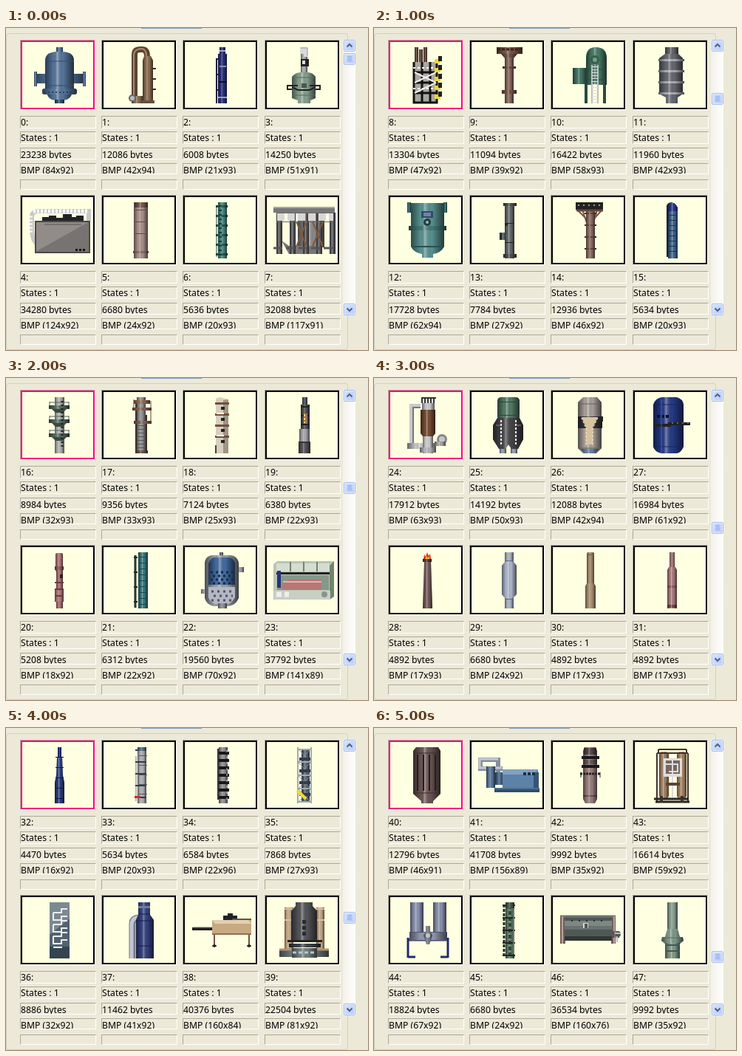
Recreate the animation shown at these times as an HTML page. Size 490 by 436 pixels, loop 6000 ms.

```html
<!DOCTYPE html>
<html lang="en">
<head>
<meta charset="utf-8">
<title>Symbol library</title>
<style>
html, body { margin: 0; width: 100%; height: 100%; overflow: hidden; background: #ece9d8; }
body { position: relative; font: 12.2px "Noto Sans", sans-serif; color: #000; }
body > *, .cell > * { position: absolute; box-sizing: border-box; }
#tab { left: 183px; top: 0; width: 82px; height: 1px; background: #7f9db9; }
#group { left: 0; top: 7px; width: 463px; height: 429px; border: 1px solid #d0d0bf; border-radius: 4px; }
#view { left: 19px; top: 16px; width: 434px; height: 420px; overflow: hidden; }
#strip { display: grid; grid-template-columns: 110px 110px 111px 103px; grid-auto-rows: 210px; animation: page 6s steps(6) infinite; }
@keyframes page { to { transform: translateY(-2520px); } }
.cell { position: relative; }
.cell > * { left: 0; margin: 0; border: 1px solid; border-color: #aca899 #fff #fff #aca899; overflow: hidden; white-space: nowrap; }
.cell svg { top: 0; width: 102px; height: 95px; background: #ffffe1; box-shadow: inset 0 0 0 2px #000; }
.cell:nth-child(8n+1) svg { box-shadow: inset 0 0 0 2px #ff0080; }
.cell p { width: 103px; line-height: 15px; }
.cell p:nth-of-type(1) { top: 103px; height: 17px; }
.cell p:nth-of-type(2) { top: 124px; height: 17px; }
.cell p:nth-of-type(3) { top: 146px; height: 16px; line-height: 17px; }
.cell p:nth-of-type(4) { top: 167px; height: 15px; line-height: 17px; }
.cell p:nth-of-type(5) { top: 189px; height: 14px; }
#track { left: 456px; top: 16px; width: 17px; height: 373px; background: linear-gradient(90deg, #f3f1ec, #fefefb); }
.button { left: 457px; width: 16px; height: 16px; border: 1px solid #a9bfee; border-radius: 2px; box-shadow: inset 0 0 0 1px #e4ecff; background: linear-gradient(135deg, #d5e2fe, #b9cbf5); }
.button svg { position: absolute; left: 0; top: 0; width: 14px; height: 14px; }
#thumb { animation: scroll 6s steps(6) infinite; }
@keyframes scroll { from { top: 34px; } to { top: 356px; } }
</style>
</head>
<body>
<svg width="0" height="0"><defs><linearGradient id="round">
<stop offset="0" stop-opacity=".5"/><stop offset=".3" stop-opacity="0"/>
<stop offset=".42" stop-color="#fff" stop-opacity=".38"/><stop offset=".62" stop-opacity="0"/>
<stop offset="1" stop-opacity=".6"/></linearGradient></defs></svg>
<div id="tab"></div>
<div id="group"></div>
<div id="view"><div id="strip"></div></div>
<div id="track"></div>
<div class="button" style="top:16px"><svg><path d="M3.5 8.5L7 5L10.5 8.5" fill="none" stroke="#4d6185" stroke-width="2"/></svg></div>
<div class="button" style="top:373px"><svg><path d="M3.5 5.5L7 9L10.5 5.5" fill="none" stroke="#4d6185" stroke-width="2"/></svg></div>
<div class="button" id="thumb"><svg><path d="M4 3.5H10M4 5.5H10M4 7.5H10M4 9.5H10" stroke="#8caaec"/></svg></div>
<script>
// Drawing space: x = 0 is the icon axis, y runs from 0 to 76.
const box = (x, y, w, h, c, r = 0) => `<rect x="${x}" y="${y}" width="${w}" height="${h}" rx="${r}" fill="${c}"/>`;
const tube = (x, y, w, h, c, r) => box(x, y, w, h, c, r) + box(x, y, w, h, 'url(#round)', r);
const shape = (d, c) => `<path d="${d}" fill="${c}"/>`;
const solid = (d, c) => shape(d, c) + shape(d, 'url(#round)');
const line = (d, c, w = 1, dash = '') => `<path d="${d}" fill="none" stroke="${c}" stroke-width="${w}" stroke-dasharray="${dash}"/>`;
const disc = (x, y, r, c) => `<circle cx="${x}" cy="${y}" r="${r}" fill="${c}"/>`;
const times = (n, f) => Array.from({ length: n }, (_, i) => f(i)).join('');
const bands = (n, y, step, x, w, h, c) => times(n, i => box(x, y + i * step, w, h, c));
const rings = (n, y, step, x, w, h, c) => times(n, i => tube(x, y + i * step, w, h, c));

const strip = document.getElementById('strip');
let count = 0;
function add(bytes, size, ...parts) {
  strip.insertAdjacentHTML('beforeend', `<div class="cell">
    <svg><g transform="translate(52 9)">${parts.join('')}</g></svg>
    <p>${count++}:</p><p>States : 1</p><p>${bytes} bytes</p><p>BMP (${size})</p><p></p></div>`);
}

const steel = '#55759b', navy = '#27317d', brown = '#8c6d50', dark = '#222';

add(23238, '84x92', tube(-4, 0, 9, 8, steel), tube(-34, 36, 70, 13, steel),
  tube(-34, 33, 4, 20, steel), tube(32, 33, 4, 20, steel),
  solid('M-19 18Q-19 7-4 6H5Q20 7 20 18V57H-19Z', steel), line('M-19 19H20M-19 52H20', '#304e70'),
  solid('M-17 61H18Q15 72 5 72H-5Q-15 72-17 61Z', steel), tube(-23, 56, 47, 8, steel, 3),
  line('M-20 61H21', '#24405f', 2, '2 3'), tube(-6, 71, 13, 5, '#345273'));
add(12086, '42x94', line('M-8 68V10Q-8 3 0 3H2Q9 3 9 12', '#5b4431', 8), line('M-9 68V10Q-8 2 2 2Q8 3 8 12', '#a68968', 2),
  solid('M5 12H14L17 18V76H3V18Z', brown), bands(3, 28, 14, 16, 5, 2, '#3a2c20'),
  tube(-12, 66, 16, 10, brown), disc(-11, 69, 5, '#666'), disc(-11, 69, 3, '#bbb'), box(2, 72, 17, 4, '#66503c'));
add(6008, '21x93', tube(-3, 0, 8, 9, navy), box(-3, 4, 8, 2, '#aab'), tube(-5, 9, 12, 67, navy),
  bands(3, 15, 21, -8, 5, 2, dark), line('M-7 15V76', '#15193f', 2), box(-3, 25, 9, 2, '#8d90ad'), box(-5, 46, 12, 2, '#111'), box(-5, 67, 12, 2, '#9da0b3'));
add(14250, '51x91', tube(-4, 9, 9, 28, '#aaa'), shape('M-5 0H5V13H0V9H-5Z', '#d9d9de'), line('M-4 1H5V12', '#999'),
  box(-4, 16, 11, 10, dark), box(-2, 18, 4, 5, '#ddd'), solid('M-16 40Q-11 34-4 34H5Q12 34 16 40V69L9 72V76H-8V72L-16 69Z', '#86a18d'),
  line('M-16 41H16M-16 65H16', '#526c5a'), line('M-22 51V57H-16M22 51V57H16M-22 52H-8M8 52H22', dark, 2), line('M-16 54L-8 58H8L16 54', dark, 2), box(-3, 49, 7, 6, '#455b4c'));
add(34280, '124x92', line('M-30 63V56Q-37 52-37 34V18Q-36 12-27 12H40V25', '#c8c8c8', 6), line('M-35 12H40', '#fff', 5, '3 2'), line('M-38 18V42', '#eee', 4, '3 2'),
  shape('M-23 25V20H-14V18H-4V21H5V16H17V20H23V18H33V25Z', dark), shape('M-32 26H41V67H-32Z', '#777371'),
  shape('M-32 26H41L-32 67Z', '#918c8a'), line('M-32 26H41V68H-32Z', '#4b4948', 2), bands(1, 63, 1, 22, 3, 3, '#111'), box(27, 63, 3, 3, '#111'), box(32, 63, 3, 3, '#111'), line('M-20 30H30', '#555'));
add(6680, '24x92', tube(-9, 0, 19, 76, '#ad918e'), tube(-8, 0, 18, 7, '#755952'), bands(3, 10, 16, -9, 19, 1, '#604b49'), rings(1, 66, 1, -10, 21, 3, '#86706e'));
add(5636, '20x93', tube(-5, 0, 12, 76, '#45887d'), rings(6, 4, 13, -8, 16, 3, '#285b55'), line('M-2 4V74', '#173d3a', 4, '2 4'), line('M-7 4V74', '#25524c'));
add(32088, '117x91', tube(-8, 14, 36, 47, '#8a8a88'), shape('M-30 52L-20 59H24V70H-20Z', '#777'),
  times(5, i => tube(-37 + i * 18, 14, 8, 56, '#59595b')), line('M-10 26L4 60M4 26L-10 60M12 26L26 60M26 26L12 60', '#80583b', 2),
  box(-41, 6, 83, 8, '#77777a'), line('M-41 7H42', '#aaa', 2), line('M-36 20H40', '#d7d7d7', 10, '10 4'), bands(2, 14, 12, -37, 76, 1, '#666'), line('M-41 62H42', '#555', 3, '12 5'));

add(13304, '47x92', times(3, i => tube(-17 + i * 6, i % 2 * 3, 5, 24, '#68483c')), shape('M-19 20H14V76H-19Z', '#aaa7a0'),
  line('M-18 20V75H13V20M-7 20V75M4 20V75M-18 34H13M-18 48H13M-18 62H13', '#111', 3), line('M-17 34L12 48M-17 48L12 34M-17 62L12 48', '#eee', 2),
  times(5, i => box(10, 16 + i * 12, 8, 6, '#eed92f') + box(15, 12 + i * 12, 5, 7, dark)), line('M-19 28H8M-19 56H8', '#fff', 2, '3 3'));
add(11094, '39x92', tube(-16, 0, 35, 9, '#775041'), line('M-15 3H18', '#38241d', 3, '4 2'), solid('M-10 9H12L7 15H-5Z', '#684b3f'),
  tube(-5, 14, 12, 62, '#89695e'), rings(2, 26, 32, -8, 18, 3, '#684b3f'), tube(-9, 58, 20, 5, '#775041'));
add(16422, '58x93', box(-7, 48, 4, 28, '#284b3f'), box(18, 48, 4, 28, '#284b3f'), tube(-23, 28, 19, 22, '#427463'),
  solid('M-5 15Q-5 0 8 0Q23 0 23 15V51H-5Z', '#477865'), line('M-5 30H23M-5 44H23', '#234b3d'), disc(7, 17, 6, '#345f50'), disc(7, 17, 3, '#789b89'),
  line('M3 24V76M11 24V76', '#bbb', 2), bands(13, 26, 4, 3, 8, 1, '#ddd'));
add(11960, '42x93', tube(-9, 0, 18, 12, '#64656b'), solid('M-9 9H9L15 15V63L8 68V76H-8V68L-17 63V15Z', '#666870'), rings(4, 16, 15, -18, 35, 3, '#aeb0b7'));
add(17728, '62x94', tube(-27, 1, 53, 11, '#477e7c'), tube(-27, 0, 5, 14, '#376967'), tube(22, 0, 5, 14, '#376967'), solid('M-22 8Q-15 1-5 1H6Q18 1 23 8V60Q18 69 8 70V75H-7V70Q-18 68-22 60Z', '#579290'),
  tube(-25, 32, 51, 6, '#427876'), line('M-20 60H20', '#26524f', 2), box(-8, 12, 16, 9, '#354769'), box(-5, 14, 10, 5, '#6c85a2'), disc(0, 27, 5, '#243c40'), disc(0, 27, 2, '#a2b5b4'));
add(7784, '27x92', tube(-12, 41, 10, 10, '#555b5c'), tube(-12, 42, 3, 8, dark), tube(-5, 1, 13, 75, '#666c6d'), tube(-7, 1, 18, 4, '#484d4f'), tube(-7, 70, 18, 5, '#484d4f'), bands(2, 28, 26, -5, 13, 1, dark), disc(-3, 30, 2, dark));
add(12936, '46x92', shape('M-19 0H18V10H-19Z', dark), line('M-16 4H16', '#998', 2, '2 5'), line('M-17 10L-5 22M17 10L6 22M-10 10L-4 28M10 10L5 28', '#755548', 2),
  tube(-5, 12, 12, 64, '#8c6c63'), rings(4, 14, 16, -7, 16, 2, '#61463d'), line('M-18 11H18', '#62483e', 3));
add(5634, '20x93', line('M-5 74V5Q-4 2 1 2', '#17203d', 4), solid('M-4 6Q-4 0 3 1Q8 4 8 10V76H-5Z', '#42688f'), bands(9, 10, 7, -5, 13, 1, '#1c3453'), solid('M-5 7Q-3 0 3 1L8 7V12H-5Z', '#29378a'));

const deck = (y, c) => tube(-14, y, 28, 5, c) + line(`M-13 ${y - 4}H13M-13 ${y - 5}V${y}M13 ${y - 5}V${y}`, '#52665a') + shape(`M-10 ${y + 5}H10L5 ${y + 10}H-5Z`, '#3a4a40');
add(8984, '32x93', tube(-6, 0, 13, 76, '#b5b5b2'), deck(11, '#556b60'), deck(30, '#556b60'), deck(49, '#556b60'), line('M4 5V70', dark, 3, '2 3'));
add(9356, '33x93', tube(-5, 0, 12, 76, '#939394'), line('M-6 5V76M8 24V72', '#3c2c23', 2), bands(9, 33, 5, -5, 12, 1, '#555'),
  tube(-9, 4, 22, 5, '#91694f'), tube(-11, 14, 26, 4, '#87604b'), tube(-9, 32, 24, 4, '#87604b'), line('M-9 3V18M14 5V36', '#634430'), tube(-7, 72, 17, 4, '#675348'));
add(7124, '25x93', shape('M-8 2L-3 0L9 3V76H-8Z', '#d7cfbf'), shape('M2 4L9 3V76H2Z', '#9e9585'), bands(4, 7, 15, -9, 19, 3, '#71513a'), bands(4, 13, 15, -1, 5, 4, dark), line('M-7 22H3M-7 52H3', '#fff', 2), line('M-8 65V76', '#4b4035', 2));
add(6380, '22x93', tube(-2, 0, 7, 12, '#545459'), tube(-4, 10, 12, 34, '#4e4d50'), bands(3, 12, 12, -4, 12, 2, '#222'), box(0, 22, 5, 14, '#a56f47'), line('M1 23V35', '#efcf99', 2, '3 2'), tube(-6, 43, 14, 20, '#aaa9ae'), tube(-7, 62, 16, 14, '#555356'), box(-7, 60, 16, 2, '#333'));
add(5208, '18x92', tube(-5, 1, 10, 25, '#b47578', 2), tube(-6, 19, 12, 5, '#895458'), tube(-4, 24, 9, 52, '#a86c70'), tube(-6, 49, 12, 18, '#b47578'), bands(3, 40, 9, -6, 12, 2, '#633d41'), box(1, 30, 4, 5, dark));
add(6312, '22x92', line('M-7 4V75', '#263335', 3), bands(4, 6, 20, -9, 5, 2, dark), tube(-3, 0, 13, 76, '#377980'), bands(9, 6, 8, -3, 13, 1, '#17484f'));
add(19560, '70x92', tube(-3, 0, 5, 7, '#67717b'), tube(20, 20, 10, 7, '#999ca3'), tube(-28, 50, 10, 6, '#999ca3'),
  solid('M-23 14Q-22 5-13 4H12Q21 5 23 14V62Q18 73 8 73H-9Q-20 72-23 62Z', '#999fa8'), solid('M-18 15Q-14 7-10 7H10Q16 8 18 15V44H-18Z', '#426ca0'),
  shape('M-18 47H18V61Q13 70 7 70H-9Q-16 67-18 61Z', '#b4b7c2'), times(4, i => line(`M${-15 + i % 2 * 3} ${27 + i * 5}H17`, '#172b49', 3, '3 4')), times(3, i => line(`M${-14 + i % 2 * 3} ${53 + i * 6}H15`, '#4d5468', 3, '3 5')), tube(-5, 69, 12, 7, '#8b9098'));
add(37792, '141x89', shape('M-41 16L-36 12H41V59L36 64H-41Z', '#b8c5b4'), shape('M35 18L41 12V60L35 64Z', '#718271'), box(-37, 15, 72, 11, '#d4ddce'), line('M-18 13V26M0 13V26M18 13V26', '#718271', 2),
  box(-37, 27, 72, 3, dark), box(-36, 31, 70, 20, '#85988a'), box(-36, 25, 5, 23, '#27347b'), shape('M-29 42L-20 37H24V51H-29Z', '#b77875'), line('M-28 40H24', '#e0b5ad', 2), box(-40, 52, 76, 12, '#c8d0c2'), line('M-37 57H-20', '#eee', 7, '7 4'), disc(28, 57, 4, '#88958a'));

add(17912, '63x93', line('M-9 12H-21V64', '#777', 6), line('M-9 11H-22V63', '#c8c8cc', 4), tube(-27, 62, 39, 8, '#c9c9cb'), disc(20, 57, 7, '#85858b'), disc(20, 57, 4, '#c6c6ca'), tube(10, 60, 15, 6, '#aaa'),
  line('M-8 4H12', '#333', 8, '2 2'), box(-8, 0, 20, 2, '#333'), tube(-7, 8, 17, 9, '#cccccd'), solid('M-9 17H11V49L7 54H-5L-9 49Z', '#774a31'), tube(-6, 53, 14, 23, '#d1d1d4'), tube(-10, 68, 22, 7, '#b7b7bb'));
add(14192, '50x93', tube(-12, 67, 9, 9, '#8f9daa'), tube(3, 67, 9, 9, '#8f9daa'), tube(-15, 0, 30, 31, '#537a64', 5), bands(2, 6, 18, -15, 30, 1, '#284838'),
  solid('M-15 28H15L20 38V57L13 70H4L0 64L-4 70H-13L-21 57V38Z', '#454548'), line('M-10 31V64M10 31V64', '#eee', 2, '3 2'), line('M-17 38H-10M10 38H17', '#888'));
add(12088, '42x94', solid('M-16 7L-9 0H10L16 7V69L9 76H-9L-16 69Z', '#aaa09a'), tube(-16, 26, 33, 16, '#36363a'), box(13, 26, 5, 7, '#222'), shape('M-11 27H11L4 41V64H-5V41Z', '#d7c39e'),
  line('M-11 28L-5 42V66M11 28L4 42V66', '#fff5da', 1, '3 2'), line('M-16 9H16M-16 69H16', '#65605d'), solid('M-12 70H12L8 76H-8Z', '#6482a6'));
add(16984, '61x92', solid('M-25 10Q-22 1-13 0H6Q15 2 16 10V67Q12 76 6 76H-14Q-23 74-25 67Z', '#263b87'), line('M-25 10H16M-25 67H16', '#17265c'), line('M-20 26H-4', '#0b1028', 4, '4 2'), line('M-24 38H-3V36H25', dark, 4), line('M0 35H25', '#9ca5b4', 1, '2 5'), line('M-14 3V75', '#4862a4'));
add(4892, '17x93', shape('M-5 9L-4 3L-2 6L0 0L2 5L4 2L5 10Z', '#e62b18'), shape('M-3 10L-1 5L1 8L3 5V10Z', '#ffc83e'), solid('M-4 12H5L7 76H-6Z', '#745b59'), tube(-6, 9, 12, 4, '#46383a'));
add(6680, '24x92', tube(-5, 0, 12, 76, '#abb4c6'), solid('M-5 13H7L11 18V57L6 62H-5L-9 57V18Z', '#b0b9ce'), bands(2, 11, 52, -5, 12, 1, '#667083'));
add(4892, '17x93', tube(-4, 0, 10, 43, '#a58d6b', 2), solid('M-4 42H6L8 46V76H-6V46Z', '#ad9472'), box(-4, 3, 10, 1, '#716147'));
add(4892, '17x93', tube(-3, 0, 7, 22, '#a97878'), solid('M-4 20H5L7 24V76H-6V24Z', '#b17e7e'), rings(1, 45, 1, -6, 13, 3, '#915f60'), tube(-6, 71, 13, 4, '#744749'));

add(4470, '16x92', tube(-2, 0, 5, 15, navy), solid('M-3 13H4L5 38L7 48V76H-6V48L-4 38Z', '#293d7d'), bands(5, 13, 14, -5, 11, 1, '#10183d'));
add(5634, '20x93', tube(-4, 0, 12, 76, '#aeb0b4'), line('M-6 12V73', '#778', 1), bands(5, 3, 16, -7, 15, 2, '#353a43'), bands(5, 11, 13, -2, 11, 1, '#556'), box(-8, 66, 8, 3, '#d12c29'), tube(-4, 0, 12, 5, '#526f85'));
add(6584, '22x96', tube(-4, 0, 12, 76, '#93908d'), bands(7, 6, 10, -6, 16, 4, '#171719'), line('M-5 2V71', '#383536', 2), line('M7 4V72', '#ddd', 1, '3 5'));
add(7868, '27x93', tube(-3, 2, 11, 73, '#586470'), line('M-8 0V76M10 0V76M-8 3H10M-8 20H10M-8 38H10M-8 56H10M-8 74H10', '#a4aab0', 2), times(4, i => line(`M-7 ${3 + i * 18}L9 ${20 + i * 18}M9 ${3 + i * 18}L-7 ${20 + i * 18}`, '#8d939a')), bands(4, 14, 16, -6, 15, 4, '#303e4a'), line('M-9 59L-2 65L3 70', '#f0da31', 4));
add(8886, '32x92', shape('M-13 0H14V76H-13Z', '#52636e'), shape('M-13 0H14V22L-13 44Z', '#7b8991'), box(-13, 60, 27, 16, '#344550'),
  line('M-8 14H3V9H11M-8 14V24H3V19H11M-8 30H3V25H11M-8 30V40H3V35H11M-8 46H3V41H11M-8 46V56H3V51H11M-8 61H4', '#eee', 2));
add(11462, '41x92', line('M-11 76V29Q-11 21 0 21', '#747b8b', 9), line('M-12 76V29Q-11 20 0 20', '#c1c5d0', 5), solid('M-3 0H13V17L18 24V76H-6V24L-3 17Z', '#34417f'), line('M-3 16H13M-6 25H18M-6 59H18', '#151e4c'), box(-3, 5, 16, 3, '#717ba0'));
add(40376, '160x84', line('M-40 36H-13', dark, 4), line('M-38 34H-16', '#777'), shape('M-13 24H40V43H-13Z', '#c7a982'), shape('M-13 24H36L40 29H-9Z', '#e4cfad'), line('M-13 43H40', '#8f7252', 2), shape('M2 24V18H8V15H15V18H21V24Z', dark), line('M14 23H40', '#555', 2), line('M-10 44V59M37 44V59M-13 59H-7M34 59H40', '#71533c', 2), disc(-10, 59, 2, '#222'), disc(37, 59, 2, '#222'));
add(22504, '81x92', tube(-26, 7, 12, 60, '#c9aa87'), tube(17, 7, 11, 60, '#c9aa87'), line('M-26 9H28M-26 24H-16M18 24H28', '#d9bd9d', 2), solid('M-11 0H12V5L18 12V52H-17V12L-11 5Z', '#525457'), bands(3, 24, 8, -2, 5, 5, '#292c2f'),
  box(-22, 51, 47, 3, dark), tube(-20, 56, 43, 5, '#3f4345'), tube(-33, 65, 67, 9, '#788588'), line('M-33 64H-17M18 64H34', '#b49271', 3), tube(-16, 62, 34, 13, '#737f83'), line('M-15 68H16', '#b9c4c6', 3, '5 3'));

add(12796, '46x91', solid('M-15 0H15L18 5V63L8 73V76H-8V73L-19 63V5Z', '#6a5553'), times(4, i => line(`M${-13 + i * 8} 10V59`, '#261d1d', 2)), line('M-19 8H18M-19 62H18', '#3b2d2d'));
add(41708, '156x89', line('M-8 29H-38V17H-14V37', '#868d9e', 6), line('M-9 28H-39V16H-14', '#c5c9d2', 3), tube(-30, 26, 12, 29, '#587a9e'), tube(-18, 34, 12, 17, '#466789'), box(-8, 30, 48, 25, '#5d82a8'), shape('M-8 30H40L35 37H-8Z', '#83a1c0'), box(34, 34, 7, 21, '#365576'),
  line('M20 36H36', '#182e4c', 4, '4 2'), box(-19, 55, 61, 6, '#304d70'), line('M-19 56H42', '#6f8fae'));
add(9992, '35x92', solid('M-7 0H8L10 5V70L7 76H-6L-9 70V5Z', '#9b7f7e'), tube(-8, 1, 17, 9, '#554445'), bands(2, 12, 12, -11, 24, 4, '#181719'), tube(-9, 17, 19, 6, '#655657'), line('M-13 36H15', dark, 3, '3 1'), line('M-12 34V41M14 34V41', dark), rings(1, 65, 1, -9, 19, 2, '#645151'));
add(16614, '59x92', tube(-17, 6, 13, 64, '#a88564', 5), tube(7, 6, 13, 64, '#a88564', 5), line('M-20 8V73M22 8V73M-20 8H22M-18 3H20M-18 3V8M20 3V8', '#443327', 2), box(-11, 15, 25, 25, '#ddd'), box(-8, 18, 19, 18, '#77675e'), line('M-8 23H8V33H-4M1 18V68', '#ddd', 2), line('M-8 50H11', '#594535', 4), line('M-24 70H23M-22 74H24', '#292521', 3), line('M-14 66V75M14 66V75', '#3c3229', 4));
add(18824, '67x92', tube(-23, 0, 18, 42, '#8a93b2'), tube(8, 0, 18, 42, '#8a93b2'), line('M-26 75V48M28 75V48M-26 74H-16M18 74H28M-26 51H28', '#202c68', 3), tube(-24, 41, 51, 10, '#9299ae'), bands(2, 40, 11, -24, 51, 1, '#4b556f'), solid('M-2 32H4V39L7 45L3 57H-1L-5 45L-2 39Z', '#777e8a'), disc(1, 45, 3, '#c1c3c9'));
add(6680, '24x92', tube(-4, 0, 12, 76, '#608068'), line('M-6 3V74', '#1e2920', 3, '4 2'), line('M2 4V72', '#2f4936', 4, '5 3'), bands(5, 3, 17, -8, 17, 2, dark), tube(-4, 0, 12, 8, '#47554b'), line('M7 8V70', '#9eb19d'));
add(36534, '160x76', box(-40, 18, 7, 38, '#725d5a'), box(29, 18, 6, 38, '#725d5a'), shape('M-34 20H30V52H-34Z', '#505856'), shape('M-34 25H30V32H-34Z', '#7d8884'), shape('M-34 32H30V37H-34Z', '#67716e'), box(-34, 46, 64, 6, '#303735'),
  line('M-40 19H35', '#6b7672', 3), line('M-37 19V56M33 19V56', '#b8a5a0', 2), line('M-25 25H25', '#272d2c', 2, '2 8'), box(-9, 28, 7, 7, '#d6d6d0'), box(-7, 29, 4, 6, '#4f5654'), tube(31, 39, 9, 9, '#777'), disc(38, 43, 4, '#555'), line('M34 42H42M37 46V54', '#bbb', 2));
add(9992, '35x92', tube(-6, 0, 14, 41, '#8ba594'), solid('M-6 36H8L11 47H15L16 52L10 57H-8L-14 52L-13 47H-9Z', '#7d9888'), tube(-9, 55, 20, 21, '#819b8a'), bands(2, 57, 8, -9, 20, 2, '#415b4d'), line('M-12 48H14', '#526b5c'));
</script>
</body>
</html>
```
